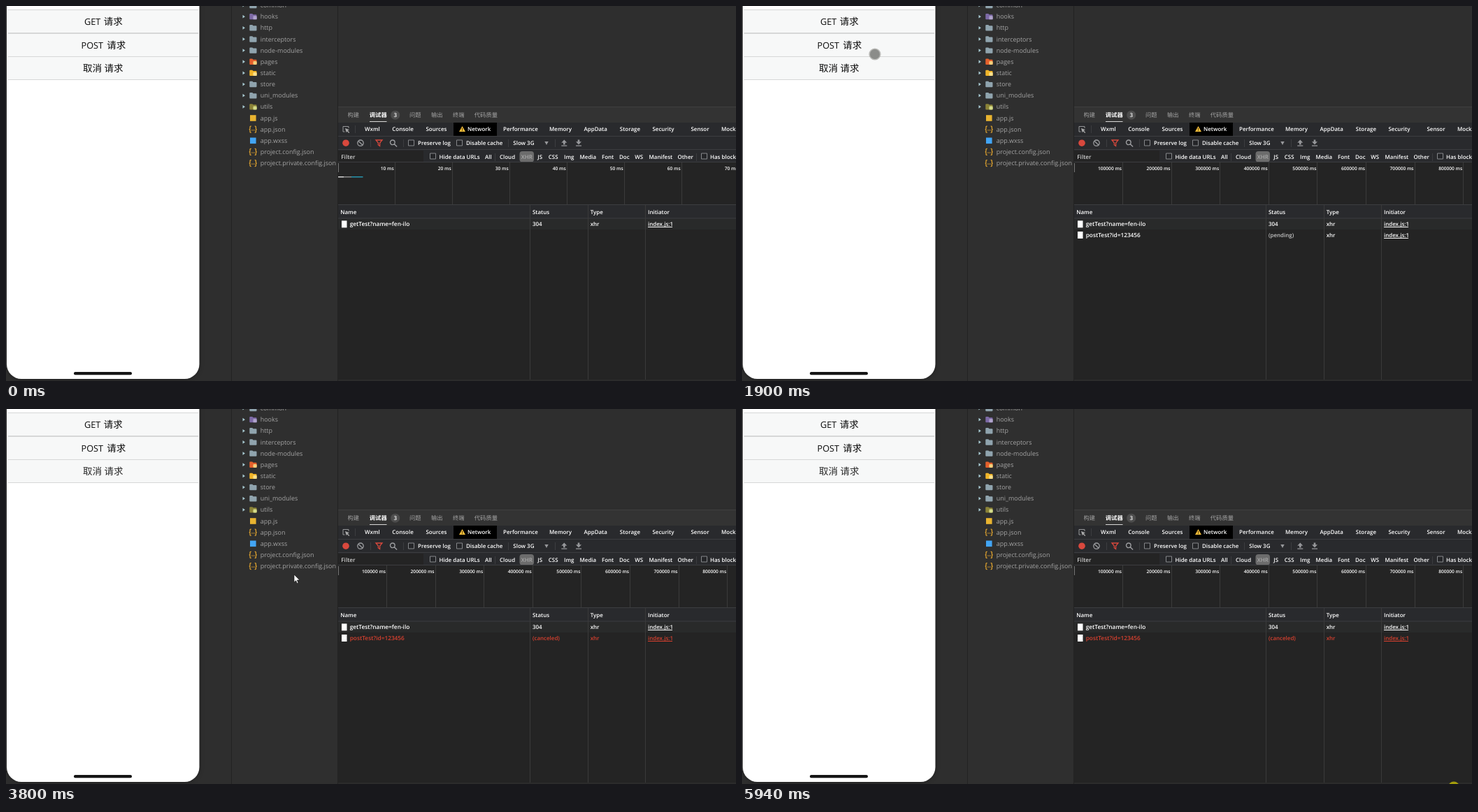
Animation of 1044x537 px, one loop 6010 ms. Source, as an HTML page with a canvas:

```html
<!DOCTYPE html>
<html lang="zh">
<head>
<meta charset="utf-8">
<style>
html, body { margin: 0; height: 100%; overflow: hidden; background: #2e2e2e; }
canvas { display: block; }
</style>
</head>
<body>
<canvas id="stage" width="1044" height="537"></canvas>
<script>
const c = document.getElementById('stage').getContext('2d');
const LOOP = 6010, WHITE = '#fff', RED = '#d8402f', LINE = '#3c3d40';
c.textRendering = 'geometricPrecision';

// y is the middle of the capitals; the baseline lands on a whole pixel.
function text(s, x, y, size = 7.95, color = WHITE, weight = 600, align = 'left') {
  c.font = `${weight} ${size}px "Open Sans", "Noto Sans CJK SC", "Noto Sans CJK", sans-serif`;
  c.textAlign = align;
  c.fillStyle = color;
  c.fillText(s, x, Math.round(y + size * .35));
}
function rect(x, y, w, h, color) {
  c.fillStyle = color;
  c.fillRect(x, y, w, h);
}
function round(x, y, w, h, r, color) {
  c.beginPath();
  c.roundRect(x, y, w, h, r);
  c.fillStyle = color;
  c.fill();
}
function disc(x, y, r, color) {
  c.beginPath();
  c.arc(x, y, r, 0, 7);
  c.fillStyle = color;
  c.fill();
}
function path(d, x, y, fill, stroke, width = 1) {
  const p = new Path2D(d);
  c.save();
  c.translate(x, y);
  if (fill) { c.fillStyle = fill; c.fill(p); }
  if (stroke) { c.strokeStyle = stroke; c.lineWidth = width; c.stroke(p); }
  c.restore();
}
const labels = (list, y, ...style) => list.forEach(([s, x]) => text(s, x, y, ...style));
const vline = (x, y, h, color = LINE) => rect(x, y, 1, h, color);
const box = (x, y) => path('M.5 .5h8v8h-8z', x, y, '#242528', '#85878a');

function phone(t) {
  c.save();
  c.shadowColor = 'rgba(0,0,0,.35)';
  c.shadowBlur = 6;
  round(1, -40, 275.5, 574, 21, '#fff');
  c.restore();
  const pressed = t >= 1490 && t < 1700 ? 1 : t >= 2850 && t < 3050 ? 2 : -1;
  [['GET', 112, 139.8], ['POST', 107.5, 144.3], ['取消', 110, 140.5]].forEach(([s, x, x2], i) => {
    const y = Math.round(5 + i * 33.5);
    rect(3, y, 272, 34, i === pressed ? '#dedede' : '#f7f8f8');
    rect(3, y, 272, 1, '#d6d7d7');
    rect(3, y + 33, 272, 1, '#d6d7d7');
    const color = i === 2 && t >= 2850 ? '#292929' : '#0b0b0b';
    text(s, x, y + 17.3, i < 2 ? 12.7 : 13.6, color, 400);
    text('请求', x2, y + 17.3, 13.5, color, 400);
  });
  round(97, 524, 83, 4.3, 2, '#161616');
}

const files = [
  ['common', '#90a4ae'], ['hooks', '#7d6aa6', '#b0a4cc'], ['http', '#90a4ae'], ['interceptors', '#90a4ae'],
  ['node-modules', '#90a4ae'], ['pages', '#e4602c', '#f6cf7a'], ['static', '#f0b429', '#fbe08a'],
  ['store', '#90a4ae'], ['uni_modules', '#90a4ae'], ['utils', '#8b8338', '#d5dc8a'],
  ['app.js', '#e9b430'], ['app.json'], ['app.wxss', '#42a5f5'], ['project.config.json'], ['project.private.config.json']
];
function sidebar() {
  rect(322, 0, 1, 537, '#232323');
  rect(323, 0, 151, 537, '#2f2f2f');
  files.forEach(([name, color, mark], i) => {
    const y = -1 + i * 16.15;
    text(name, 363.7, y, 8.98, '#a3a3a3', 400);
    if (i < 10) {
      path('M0 -2.4L3.4 0L0 2.4z', 338.5, y, '#a9cbd3');
      path('M0 -3.2q0-1 1-1h3l1.2 1.2h4q1 0 1 1v5.2q0 1-1 1h-8.2q-1 0-1-1z', 348.3, y, color);
      if (mark) round(353.5, y - .8, 5.2, 5, 1.2, mark);
    } else if (color) {
      rect(349, y - 4.3, 8.6, 8.6, color);
    } else {
      path('M3-4.5h-.7q-1 0-1 1v2.3q0 1.2-1.3 1.2q1.3 0 1.3 1.2v2.3q0 1 1 1h.7M8-4.5h.7q1 0 1 1v2.3q0 1.2 1.3 1.2q-1.3 0-1.3 1.2v2.3q0 1-1 1h-.7', 347.7, y, null, '#e3a52f', 1.2);
      rect(351.4, y + .5, 1.3, 1.3, '#e3a52f');
      rect(354, y + .5, 1.3, 1.3, '#e3a52f');
    }
  });
}

function toolbars() {
  rect(474, 0, 1, 537, '#222');
  rect(475, 0, 569, 144, '#2e2e2e');
  rect(475, 144, 569, 1, '#3f3f3f');
  rect(475, 145, 569, 22, '#333');
  labels([['构建', 488.5], ['问题', 577], ['输出', 608], ['终端', 639], ['代码质量', 669.8]], 156, 8.3, '#a4a4a4', 400);
  text('调试器', 519.8, 156, 8.3, '#fff', 700);
  rect(520, 165, 24.5, 1, '#d5d5d5');
  disc(556.7, 156.2, 6.5, '#4d4d4d');
  text('3', 556.7, 156.2, 8, '#fff', 600, 'center');

  rect(475, 167, 569, 57, '#292a2d');
  rect(475, 186, 569, 1, LINE);
  rect(475, 205, 569, 1, LINE);
  rect(640, 167, 62, 19, '#000');
  path('M4.5 0L9 8H0z', 648, 172, '#f3bd3a');
  rect(652, 174.8, 1, 2.6, '#4a3300');
  rect(652, 178, 1, 1, '#4a3300');
  labels([['Wxml', 513], ['Console', 552.3], ['Sources', 600.5], ['Network', 660], ['Performance', 711], ['Memory', 777],
    ['AppData', 826.5], ['Storage', 877.8], ['Security', 924.5], ['Sensor', 979.5], ['Mock', 1023]], 176.4);
  path('M3 8H.5V.5h8V3', 481.5, 172, null, '#969799');
  path('M0 0l6 2.2L3.7 3.4 6.3 6l-1 1L2.8 4.4 1.8 6.3z', 485, 175, '#aaa');
  vline(499, 171, 11);

  disc(486, 196.2, 4.8, '#d8483d');
  path('M4.2 0A4.2 4.2 0 1 1-4.2 0A4.2 4.2 0 1 1 4.2 0M-3-3L3 3', 507, 196.2, null, '#9c9da0', 1.3);
  path('M0 0h9L5.6 4v4.5L3.4 7V4z', 529, 192, null, '#d8483d', 1.3);
  path('M6.6 3.3A3.3 3.3 0 1 1 0 3.3A3.3 3.3 0 1 1 6.6 3.3M5.8 5.8L9.6 9.6', 549.5, 192, null, '#9c9da0', 1.4);
  [521, 568, 718, 785].forEach(x => vline(x, 191, 11));
  box(575, 191.5);
  box(644, 191.5);
  labels([['Preserve log', 589], ['Disable cache', 658], ['Slow 3G', 725.3]], 196.4);
  path('M0 0h5.4L2.7 5z', 770.3, 194, '#96979a');
  path('M4 0L8 4.2H5.3V7H2.7V4.2H0zM0 8h8v1.2H0z', 794.3, 191.5, '#96979a');
  path('M2.7 0h2.6v2.8H8L4 7 0 2.8h2.7zM0 8h8v1.2H0z', 815, 191.5, '#96979a');

  rect(475, 207, 122, 16, '#242424');
  text('Filter', 479.3, 216.2, 8.15, '#d0d0d0');
  box(606, 210.5);
  box(994, 210.5);
  round(734.5, 208, 20.5, 15.5, 4, '#6c6c6c');
  text('XHR', 736.8, 216.2, 8, '#a9a9a9');
  labels([['Hide data URLs', 619.5], ['All', 685], ['Cloud', 706], ['JS', 760.3], ['CSS', 775.8], ['Img', 798], ['Media', 820.5],
    ['Font', 852], ['Doc', 877], ['WS', 899.3], ['Manifest', 919.5], ['Other', 960.5], ['Has blocked', 1007]], 216.2);
  vline(699, 211, 11);
  vline(987, 211, 11);
}

function timeline(posted) {
  rect(475, 224, 569, 60, '#242424');
  rect(475, 223, 569, 1, LINE);
  const [unit, first, step] = posted ? [100000, 544, 69.6] : [10, 555.7, 82];
  for (let i = 0; i < 8; i++) {
    const x = first + i * step;
    vline(Math.round(x), 224, 60, '#3b3b3b');
    text((i + 1) * unit + ' ms', x - 1, 232.2, 6.65, WHITE, 600, 'right');
  }
  vline(475, 225, 13, '#777');
  if (!posted) {
    rect(475, 244, 8, 1.5, '#d8d8d8');
    rect(483, 244, 11, 1.5, '#8c8c8c');
    rect(494, 244, 16.5, 1.5, '#2795ad');
  }
}

function row(y, name, status, color, statusColor = color) {
  rect(480, y - 5, 7.5, 10, '#fff');
  text(name, 491.7, y, 8.3, color);
  text(status, 753, y, 7.95, statusColor);
  text('xhr', 835.7, y, 7.95, color);
  text('index.js:1', 918, y, 7.95, color);
  rect(918, Math.round(y + 4), 35, 1, color);
}
function table(t, posted) {
  const canceled = t >= 2920, hover = t >= 4550 && t < 4690;
  rect(475, 284, 569, 253, '#242424');
  rect(475, 284, 569, 20, '#292a2d');
  rect(475, 284, 569, 1, LINE);
  rect(475, 304, 569, 16, '#292a2a');
  rect(475, 303.5, 569, 1, LINE);
  if (hover) rect(475, 320, 569, 15.5, '#1a2436');
  [749, 832, 914].forEach(x => vline(x, 285, 250, '#3a3a3a'));
  rect(475, 535, 569, 2, '#2b2b2b');
  labels([['Name', 478.3], ['Status', 753], ['Type', 835.7], ['Initiator', 918]], 295);
  row(312.4, 'getTest?name=fen-ilo', '304', WHITE);
  if (canceled) row(328, 'postTest?id=123456', '(canceled)', RED);
  else if (posted) row(328, 'postTest?id=123456', '(pending)', WHITE, '#c4c4c4');
  if (hover) {
    round(768, 336.5, 52, 17.5, 2, '#2a2b2d');
    text('(canceled)', 794, 345.5, 8, '#e2e2e2', 600, 'center');
  }
}

// Each move: start, end, steps, then [step, x, y] points joined by straight lines.
const moves = [
  [330, 880, 9, [0, 893, 512], [3, 600, 330], [6, 290, 140], [7, 238.5, 111.5], [8, 214, 92]],
  [950, 1080, 3, [0, 207, 83], [2, 190, 63]],
  [1900, 2250, 6, [0, 190, 69], [5, 190.7, 87.5]],
  [3310, 3870, 9, [0, 196, 94], [3, 250, 160], [7, 412, 237], [8, 452, 222]],
  [3940, 4480, 9, [0, 520, 246], [4, 940, 318], [8, 808, 330]],
  [4550, 5120, 9, [0, 797, 352], [8, 977, 507]],
  [5190, 5740, 9, [0, 980, 511], [6, 1010, 535], [8, 1012, 545]]
];
function pointer(t) {
  if (t >= 5940) return disc(1018, 541.5, 8, '#a39c0c');
  const move = moves.findLast(m => t >= m[0]);
  if (!move) return;
  const [start, end, steps, ...points] = move;
  const k = Math.min(steps - 1, Math.floor((t - start) / (end - start) * (steps - 1) + .1));
  const i = Math.max(1, points.findIndex(p => p[0] >= k));
  const [a, b] = [points[i - 1], points[i]];
  const f = (k - a[0]) / (b[0] - a[0]);
  const x = a[1] + (b[1] - a[1]) * f, y = a[2] + (b[2] - a[2]) * f;
  if (x < 277) {
    disc(x, y, 8.6, 'rgba(165,165,162,.75)');
    disc(x, y, 7, '#8b8c89');
  } else {
    path('M0 0V11.2L2.6 8.8 4.3 12.8 6.1 12 4.4 8.1H8z', x, y, '#fff', '#151515', .7);
  }
}

function draw(now) {
  const t = now % LOOP, posted = t >= 1560;
  rect(0, 0, 1044, 537, '#2e2e2e');
  phone(t);
  sidebar();
  toolbars();
  timeline(posted);
  table(t, posted);
  pointer(t);
}
let begin;
function frame(now) {
  begin ??= now;
  draw(now - begin);
  requestAnimationFrame(frame);
}
draw(0);
requestAnimationFrame(frame);
</script>
</body>
</html>
```
